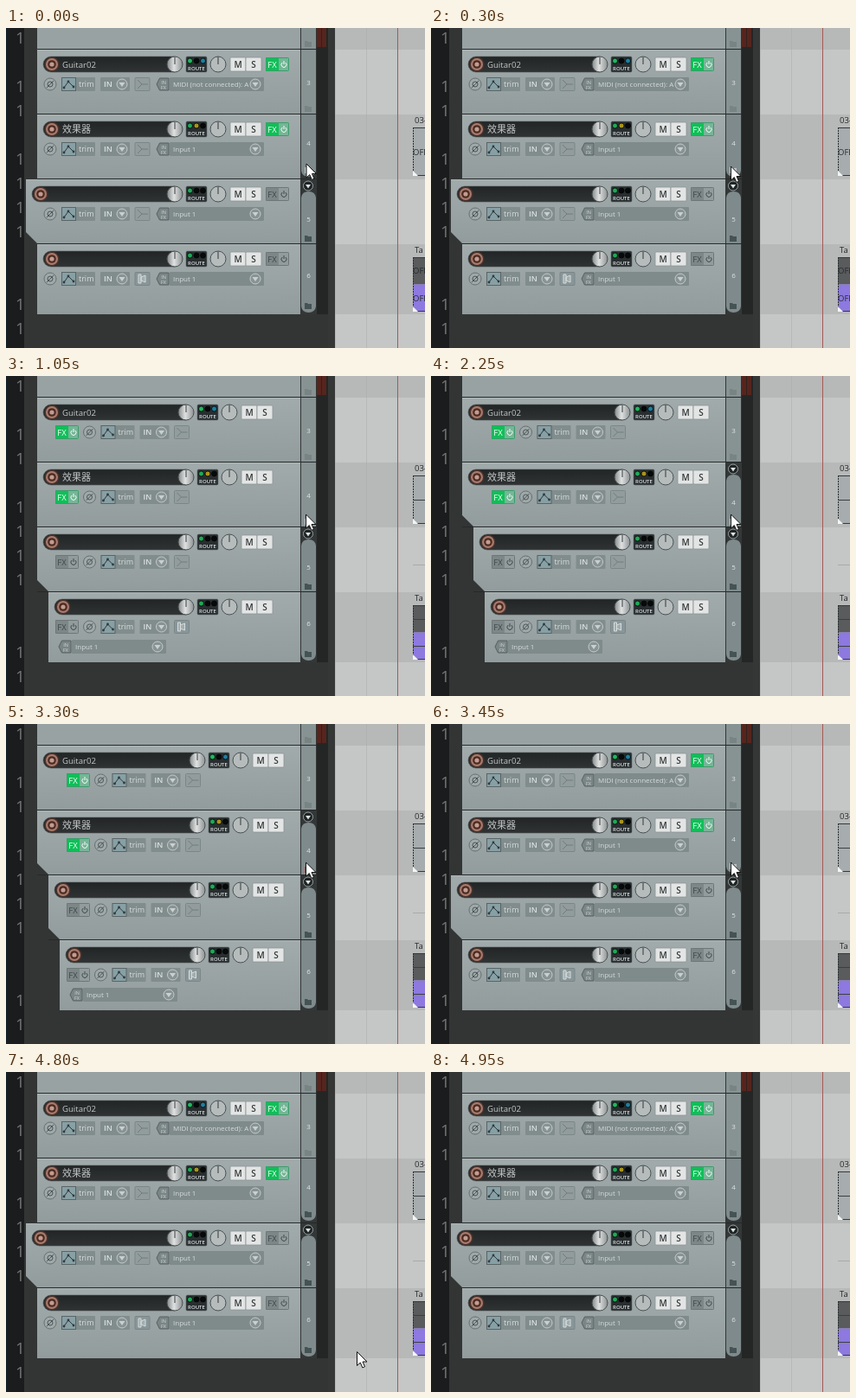
Recreate the animation shown at these times as an HTML page. Size 484 by 370 pixels, loop 5550 ms.

```html
<!DOCTYPE html>
<html lang="en">
<head>
<meta charset="utf-8">
<title>Track folders</title>
<style>
html, body { margin: 0; width: 100%; height: 100%; overflow: hidden; background: #333 }
svg { display: block; width: 484px; height: 370px }
text { font-family: "Open Sans", "Noto Sans CJK SC", "Noto Sans CJK", sans-serif }
</style>
</head>
<body>
<svg id="stage" viewBox="0 0 484 370">
  <defs>
    <linearGradient id="panel" x2="0" y2="1"><stop stop-color="#a2abac"/><stop offset="1" stop-color="#929c9d"/></linearGradient>
    <linearGradient id="knob"><stop stop-color="#858989"/><stop offset=".45" stop-color="#e0e2e2"/><stop offset="1" stop-color="#8d9191"/></linearGradient>
    <linearGradient id="name" x2="0" y2="1"><stop stop-color="#222526"/><stop offset="1" stop-color="#303334"/></linearGradient>
  </defs>
  <g id="back"></g>
  <g id="clips"></g>
  <g id="tracks"></g>
  <g id="hover"></g>
  <path id="cursor" d="M0 0V16L3.8 12.6L6.3 18.4L9 17.2L6.5 11.5H11.5Z" fill="#fff" stroke="#111"/>
</svg>
<script>
const LOOP = 5550;
const $ = id => document.getElementById(id);
const rect = (x, y, w, h, fill, more = '') => `<rect x="${x}" y="${y}" width="${w}" height="${h}" fill="${fill}" ${more}/>`;
const circle = (x, y, r, fill, more = '') => `<circle cx="${x}" cy="${y}" r="${r}" fill="${fill}" ${more}/>`;
const path = (d, stroke, fill = 'none', more = '') => `<path d="${d}" stroke="${stroke}" fill="${fill}" ${more}/>`;
const text = (x, y, size, fill, s, more = '') => `<text x="${x}" y="${y}" font-size="${size}" fill="${fill}" ${more}>${s}</text>`;
const mid = 'text-anchor="middle"', bold = 'font-weight="600"';

// k: volume knob, p: phase button, h: input field; shift: indent of tracks 5 and 6
const layouts = {
  side:   { k: 195, p: 51,    h: 181, x5: 23, x6: 36, wide: true,  bar4: 'last' },
  nested: { k: 208, p: 96.5,  h: 68,  x5: 36, x6: 49, wide: false, bar4: 'plain' },
  deep:   { k: 221, p: 109.5, h: 81,  x5: 49, x6: 62, wide: false, bar4: 'parent' }
};

const songs = [
  { n: 3, y: 25,  h: 74, name: 'Guitar02', size: 9.6, dots: ['#20b860', '#080a0a', '#1e7fa0'], fx: true, input: 'MIDI (not connected): A' },
  { n: 4, y: 100, h: 74, name: '效果器', size: 11, dots: ['#20a858', '#a8941c', '#080a0a'], fx: true, input: 'Input 1' },
  { n: 5, y: 175, h: 74, name: '', dots: ['#20a858', '#080a0a', '#080a0a'], input: 'Input 1' },
  { n: 6, y: 250, h: 81, name: '', dots: ['#20a858', '#080a0a', '#080a0a'], input: 'Input 1', monitor: true }
];

const folder = (x, y, fill) => path(`M${x - 4} ${y + 4}V${y - 3}H${x - 1}L${x} ${y - 2}H${x + 4}V${y + 4}Z`, 'none', fill);

const drop = (x, y) => circle(x, y, 6, '#899394', 'stroke="#c3cbcb"') +
  path(`M${x - 3.5} ${y - 2}H${x + 3.5}L${x} ${y + 3}Z`, 'none', '#c8d0d0');

const record = (x, y) => circle(x, y, 8.5, '#4a332d') + circle(x, y, 7, '#a87b6c') +
  circle(x, y, 4.8, '#4b2a23') + circle(x, y, 2.6, '#c19c8f');

const dial = (x, y, fill) => circle(x, y, 9, fill, 'stroke="#4b5152"') + path(`M${x} ${y - 8.5}V${y}`, '#333839');

function fxButton(x, y, on) {
  const ink = on ? '#f2fff7' : '#3f484a';
  return rect(x, y - 8, 15, 16, on ? '#0fbf58' : '#7d8788') +
    rect(x + 15, y - 8, 12, 16, on ? '#76b597' : '#929c9d') +
    rect(x + .5, y - 7.5, 26, 15, 'none', `stroke="${on ? '#3c9c6b' : '#6d7778'}" rx="1"`) +
    text(x + 7.5, y + 3.6, 9.5, ink, 'FX', mid) +
    path(`M${x + 19.2} ${y - 2}a3 3 0 1 0 3.6 0M${x + 21} ${y - 4}v4`, ink);
}

function routing(x, y, dots) {
  return rect(x - 12, y - 9, 24, 18, '#292e30', 'rx="1.5" stroke="#5d6566" stroke-width=".6"') +
    dots.map((c, i) => circle(x - 7.5 + i * 7.5, y - 4, 3, c, 'stroke="#050606" stroke-width=".8"')).join('') +
    text(x, y + 7, 6, '#dde2e2', 'ROUTE', mid + bold);
}

const button = (x, y, s) => rect(x - 9, y - 8, 18, 16, '#e3e5e5', 'rx="1" stroke="#8b9495" stroke-width=".8"') +
  text(x, y + 3.6, 10, '#343839', s, mid + bold);

function inputField(x, y, s) {
  return rect(x + 8, y - 8, 109, 16, '#7f8a8b', 'rx="1"') +
    path(`M${x - 7} ${y}L${x - 3.5} ${y - 7}H${x + 7}V${y + 7}H${x - 3.5}Z`, '#565f60', '#7a8586') +
    text(x + 1, y - .5, 5.5, '#d2d9d9', 'IN', mid) + text(x + 1, y + 5.5, 5.5, '#d2d9d9', 'FX', mid) +
    text(x + 12, y + 3, 8, '#d6dddd', s) + drop(x + 107, y);
}

function lowerRow(p, y, monitor) {
  const icon = p + 106;
  return circle(p, y, 7, '#a0a9aa', 'stroke="#667071"') +
    circle(p, y, 3, 'none', 'stroke="#4d5657"') + path(`M${p - 4} ${y + 4}L${p + 4} ${y - 4}`, '#4d5657') +
    rect(p + 13, y - 8, 39, 16, '#818c8d', 'rx="1"') +
    rect(p + 13.5, y - 7.5, 16, 15, '#87a0a5', 'stroke="#596466"') +
    path(`M${p + 16} ${y + 4}L${p + 21} ${y - 3}L${p + 27} ${y + 3}`, '#2f393b') +
    [[16, 4], [21, -3], [27, 3]].map(([a, b]) => circle(p + a, y + b, 1.4, '#2f393b')).join('') +
    text(p + 33, y + 3.2, 9, '#d8dfdf', 'trim') +
    rect(p + 58, y - 8, 34, 16, '#818c8d', 'rx="1"') +
    text(p + 62, y + 3.4, 9, '#dde3e3', 'IN', bold) + drop(p + 83, y) +
    rect(icon - 8, y - 7.5, 17, 15, monitor ? '#88969a' : '#929c9d', 'stroke="#7b8687" rx="1"') +
    (monitor
      ? path(`M${icon - 4} ${y - 5}h3v10h-3ZM${icon - 1} ${y - 2}l5 -2v8l-5 -2Z`, '#d5dcdc', '#a3adae')
      : path(`M${icon - 5} ${y - 5}L${icon} ${y}L${icon - 5} ${y + 5}M${icon} ${y}H${icon + 7}`, '#717c7d'));
}

// kind: plain, parent (button on top) or last (rounded foot)
function sideBar({ n, y, h }, kind) {
  const top = kind == 'parent' ? y + 14 : y;
  const end = kind == 'last' ? y + h - 2 : y + h;
  const label = y + h / 2 + { plain: 0, parent: 8, last: -5 }[kind];
  const fill = kind == 'plain' ? '#879293' : '#7e8a8b';
  const head = kind == 'parent' ? `M341 ${top + 7}q1 -7 8.5 -7t8.5 7` : `M341 ${top}H358`;
  const foot = kind == 'last' ? `V${end - 7}q-1 7 -8.5 7t-8.5 -7Z` : `V${end}H341Z`;
  let s = rect(341, y, 18, h, '#343737') + path(head + foot, 'none', fill);
  if (kind == 'parent') {
    s += circle(349, y + 7.5, 5.5, '#1f2425', 'stroke="#98a2a3"') +
      path(`M346 ${y + 6}h6l-3 4.5Z`, 'none', '#dbe1e1');
  }
  const iconY = kind == 'last' ? y + h - 10 : y + h - 6;
  return s + folder(349, iconY, kind == 'plain' ? '#788384' : '#465354') +
    text(349.5, label + 3.5, 8, '#e0e6e6', n, mid);
}

function track(song, lay) {
  const { n, y, h } = song, { k, p } = lay;
  const x = n == 5 ? lay.x5 : n == 6 ? lay.x6 : 36;
  const parent = n == 5 || (n == 4 && lay.bar4 == 'parent');
  const a = y + 17, b = y + 40, bottom = y + h;
  const corner = parent ? `H${x + 13}L${x} ${bottom - 13}Z` : `H${x}Z`;
  let s = path(`M${x} ${y}H340V${bottom}${corner}`, 'none', 'url(#panel)') +
    rect(x, y, 304 + 36 - x, 1, '#adb6b7');
  if (n < 6) s += rect(Math.max(x, 36), bottom, 359 - Math.max(x, 36), 1, '#252929');
  s += path(`M${x + 16} ${a - 9}H${k}V${a + 9}H${x + 16}a9 9 0 0 1 0 -18Z`, '#4b5152', 'url(#name)', 'stroke-width=".6"') +
    record(x + 17, a) + text(x + 29, a + 3.6, song.size || 10, '#c3c7c7', song.name) +
    dial(k, a, 'url(#knob)') + routing(k + 25, a, song.dots) + dial(k + 50, a, '#b6bcbc') +
    button(k + 73, a, 'M') + button(k + 91, a, 'S') + lowerRow(p, b, song.monitor);
  if (lay.wide) s += fxButton(k + 105, a, song.fx) + inputField(lay.h, b, song.input);
  else s += fxButton(p - 39.5, b, song.fx) + (n == 6 ? inputField(lay.h, y + 63, song.input) : '');
  const kind = n == 4 ? lay.bar4 : { 3: 'plain', 5: 'parent', 6: 'last' }[n];
  return s + sideBar(song, kind);
}

function backdrop() {
  let s = rect(0, 0, 484, 370, '#333535') + rect(0, 0, 21, 370, '#1b1c1d') + rect(0, 0, 1, 370, '#14202d');
  for (const y of [11, 67, 95, 151, 179, 207, 235, 319, 347]) s += text(16.5, y + 7, 19, '#737575', '1', mid);
  s += rect(36, 0, 304, 24, '#98a2a3') + rect(341, 0, 17, 24, '#879293') + folder(349, 18, '#788384') +
    rect(36, 24, 323, 1, '#252929') + rect(359, 0, 13, 331, '#242626') + rect(359, 0, 11, 22, '#56251d') +
    rect(364, 0, 1, 22, '#32201d') + rect(372, 0, 8, 370, '#353737');
  [0, 25, 100, 175, 250, 331, 370].forEach((y, i, all) => {
    if (i < 6) s += rect(380, y, 104, all[i + 1] - y, i % 2 ? '#c5c6c6' : '#b7b8b8');
  });
  for (const x of [380, 416, 452]) s += rect(x, 0, 1, 370, '#a9abab', 'opacity=".5"');
  return s + rect(452, 0, 1, 370, '#a75a55');
}

function clip(y, h, title, fills, off) {
  const part = h / fills.length;
  let s = text(472, y - 5, 9.5, '#24292a', title);
  fills.forEach((f, i) => s += rect(470, y + i * part, 14, part, f));
  s += rect(470, y, 14, 1, '#343a3b') + rect(470, y + h - 1, 14, 1, '#343a3b') +
    path(`M470.5 ${y}V${y + h}`, '#2b3030', 'none', 'stroke-dasharray="2 1"');
  fills.forEach((f, i) => {
    const c = y + (i + .5) * part;
    s += off ? text(470, c + 3.5, 9.5, '#262b2d', 'OFF') : rect(470, Math.round(c), 14, 1, '#3a4041');
  });
  return s + path(`M470 ${y + h - 6}L476 ${y + h}H470Z`, 'none', '#f4f5f5');
}

const clips = off => clip(115, 56, '03-', ['#a7adae'], off) +
  clip(265, 63, 'Ta', ['#595b5c', '#8d79df'], off) + (off ? '' : rect(470, 218, 14, 1, '#a8abab'));

function hoverIcon(t) {
  if (t >= 4800) return '';
  const y = t < 1050 || t >= 3450 ? 164 : 168;
  return folder(349, y, t >= 3300 && t < 3450 ? '#a64a47' : '#b9c3c3');
}

const steps = [0, 150, 300, 1050, 2250, 3300, 3450, 4800, 4950];
const cursorAt = [[347, 157], [347, 159], [346.5, 160], [346.5, 160], [346.5, 160], [346.5, 160], [346.5, 160], [405.5, 323.5]];
let shown = -1;

function draw() {
  const t = performance.now() % LOOP;
  const step = steps.filter(s => s <= t).length - 1;
  if (step != shown) {
    shown = step;
    const lay = t < 1050 || t >= 3450 ? layouts.side : t < 2250 ? layouts.nested : layouts.deep;
    $('clips').innerHTML = clips(t < 1050);
    $('tracks').innerHTML = songs.map(s => track(s, lay)).join('');
    $('hover').innerHTML = hoverIcon(t);
    const at = cursorAt[step];
    $('cursor').setAttribute('visibility', at ? 'visible' : 'hidden');
    if (at) $('cursor').setAttribute('transform', `translate(${at})`);
  }
  requestAnimationFrame(draw);
}

$('back').innerHTML = backdrop();
draw();
</script>
</body>
</html>
```
